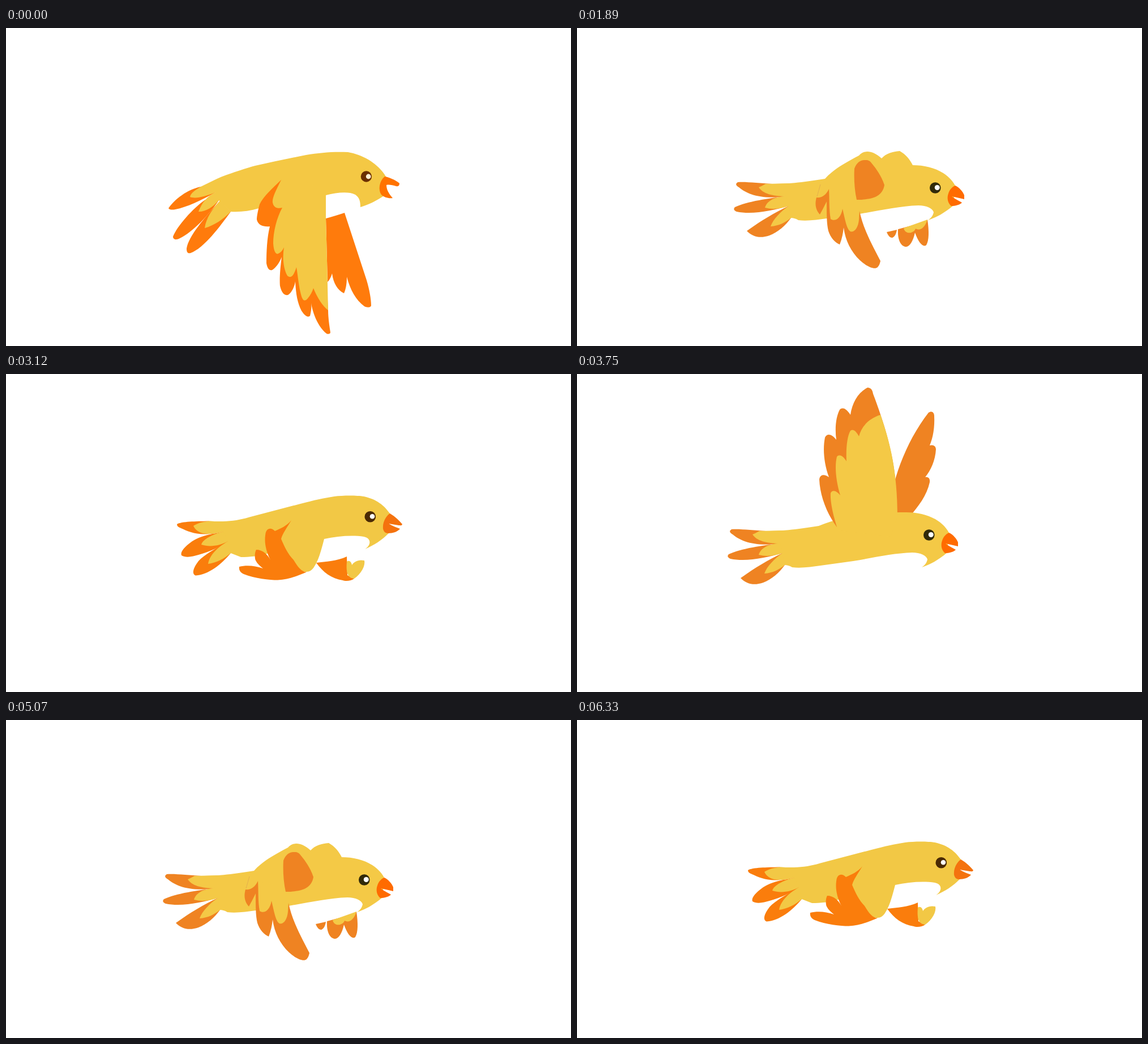
These frames come from a looping animation (998x561 px, 6.39 s). An HTML page:

```html
<!DOCTYPE html>
<html lang="en">
<head>
<meta charset="utf-8">
<title>Flying bird</title>
<style>
  html, body { margin: 0; width: 100%; height: 100%; overflow: hidden; background: #fff; }
  svg { display: block; width: 100%; height: 100%; }
  .pose { visibility: hidden; }
  .pose.on { visibility: visible; }
  .y { fill: var(--y); }
  .o { fill: var(--o); }
  .beak { fill: var(--beak); }
  .eye { fill: var(--eye); }
  .glint { fill: var(--glint, #fff); }
  .down { --y: #f4c844; --o: #ff7b0c; --beak: #ff7300; --eye: #6b2f00; --glint: #fff0d4; }
  .lift, .up { --y: #f4c946; --o: #ef8322; --beak: #ff6b00; --eye: #312a0a; }
  .fold { --y: #f2c845; --o: #fa7d0c; --beak: #f4720e; --eye: #4a2a04; }
</style>
</head>
<body>
<svg viewBox="0 0 998 561" preserveAspectRatio="none">
  <defs>
    <g id="tail">
      <path class="o" d="M345,275C322,274 300,271 284,272C279,275 281,278 286,281C300,293 325,303 370,297Z"/>
      <path class="o" d="M370,297C340,300 300,306 279,316C276,319 277,322 282,324C310,330 345,322 374,314Z"/>
      <path class="o" d="M374,314C350,325 325,340 300,358C312,370 325,371 340,366C355,360 369,348 378,335Z"/>
      <path class="y" d="M333,275C328,278 324,280 321,281C328,292 345,297 370,297L400,285L380,274Z"/>
      <path class="y" d="M370,297C350,297 335,305 332,317C348,321 362,318 374,314L400,300Z"/>
      <path class="y" d="M374,314C360,323 346,338 342,350C357,349 368,343 378,335L395,325Z"/>
    </g>
    <g id="face">
      <path class="beak" d="M668,278C675,281 682,289 684,295L684,302L662,297C668,302 675,305 680,308C676,312 668,314 661,314C655,309 653,300 656,292C658,285 663,280 668,278Z"/>
      <circle class="eye" cx="632.8" cy="282" r="9.8"/>
      <circle class="glint" cx="636.3" cy="281.5" r="4.5"/>
    </g>
  </defs>

  <!-- wings down -->
  <g class="pose down on">
    <path class="o" d="M565,336C577,333 588,329 598,326L637,445C642,462 645,478 645,490C643,494 637,493 633,491C618,480 608,462 602,439C602,452 600,462 597,468C586,463 578,450 576,433C574,440 571,445 568,448Z"/>
    <path class="o" d="M344,280C320,285 298,302 287,318C289,321 294,321 299,320C320,316 345,304 370,290Z"/>
    <path class="o" d="M352,303C330,318 302,350 295,368C295,374 302,374 307,371C330,360 358,330 376,304Z"/>
    <path class="o" d="M378,305C350,335 322,368 319,389C319,397 322,398 326,397C350,388 378,350 397,324Z"/>
    <path class="y" d="M344,280C336,285 326,291 325,298C335,302 352,297 370,290L390,270Z"/>
    <path class="y" d="M370,290C355,297 346,308 340,324C354,324 365,316 376,304L390,290Z"/>
    <path class="y" d="M378,305C365,318 353,336 351,353C368,348 383,338 397,324Z"/>
    <path class="y" d="M344,280C360,272 378,263 390,259C410,252 425,247 440,243C470,236 500,230 530,224C555,220 575,218 604,219C632,224 658,240 671,262L669,295C656,304 640,312 626,316C626,305 624,299 617,294C605,288 585,290 565,295L565,336L500,330L447,318C430,323 413,325 397,324L376,304L370,290Z"/>
    <path class="o" d="M486,268C468,285 455,297 448,311C445,322 443,332 443,338C445,348 455,351 466,350C461,370 460,395 460,415C462,426 466,428 470,427C476,424 483,414 487,404C484,425 483,445 484,455C487,468 492,472 498,471C505,467 510,455 511,447C512,470 515,485 522,499C528,508 533,511 537,508C539,500 540,492 539,485C542,505 552,528 566,539C570,541 573,539 573,537C571,525 569,510 569,498L560,330L520,280Z"/>
    <path class="y" d="M486,268C476,288 470,300 471,308C473,318 481,319 488,317C478,335 472,360 472,380C473,395 477,400 481,398C486,396 489,391 491,387C488,405 490,425 497,437C503,442 508,438 513,422C516,440 517,455 521,470C524,482 528,483 533,477C538,471 541,465 543,459C550,476 559,490 569,498C568,440 566,370 565,336L565,295L530,270Z"/>
    <path class="beak" d="M669,262C676,263 688,268 695,274C695,278 693,280 689,279C683,277 676,276 672,277C672,285 676,292 683,300C676,301 668,299 663,294C657,286 659,270 669,262Z"/>
    <circle class="eye" cx="636.4" cy="262" r="9.7"/>
    <circle class="glint" cx="640.2" cy="262" r="4.4"/>
  </g>

  <!-- wings lifting -->
  <g class="pose lift">
    <path class="o" d="M547,360L565,356C564,362 562,368 557,370C552,370 549,365 547,360Z"/>
    <path class="o" d="M567,355L615,342L619,338C622,358 622,375 617,383C611,388 603,378 597,361C594,375 588,386 581,386C571,385 566,372 567,355Z"/>
    <path class="y" d="M577,353C579,361 585,362 590,361C595,359 597,357 598,354C605,358 614,354 619,338Z"/>
    <use href="#tail"/>
    <path class="y" d="M333,275C380,276 410,270 438,266C452,250 475,237 498,225C506,216 520,214 538,230C546,221 558,218 570,217C581,223 588,232 593,242C625,242 655,254 668,278L665,313C648,327 635,334 620,339C627,334 629,330 630,325C628,318 618,313 603,313C570,314 535,322 499,328L441,336C425,338 408,341 391,339C386,336 382,335 378,335L374,314L370,297Z"/>
    <path class="o" d="M490,248C494,237 501,232 510,233C515,233 518,235 520,238C530,250 538,262 543,277C540,294 528,303 494,303C490,285 489,265 490,248Z"/>
    <path class="o" d="M423,299C420,310 421,320 429,329C434,320 437,314 441,306C441,330 441,345 444,358C448,370 455,378 464,382C468,372 470,362 471,352C474,375 484,395 500,410C512,421 526,427 531,422C534,419 535,415 536,411C520,380 506,355 499,323L470,318L445,284C440,295 432,300 423,299Z"/>
    <path class="y" d="M445,284C446,300 445,320 448,337C455,342 466,337 469,319C473,335 476,355 483,359C490,361 497,352 498,338L499,322L470,290Z"/>
    <path d="M430,276L424,297" fill="none" stroke="#dfa94e" stroke-width=".8"/>
    <use href="#face"/>
  </g>

  <!-- wings up -->
  <g class="pose up" transform="translate(-11 2)">
    <path class="o" d="M560,250C566,190 590,120 632,66C638,62 642,66 642,72C643,92 640,110 634,124C640,122 645,125 645,131C644,150 636,168 626,180C632,179 635,183 634,189C629,212 614,232 598,250Z"/>
    <use href="#tail"/>
    <path class="y" d="M333,275C380,276 410,270 438,266C480,248 540,241 593,242C625,242 655,254 668,278L665,313C648,327 635,334 620,339C627,334 629,330 630,325C628,318 618,313 603,313C570,314 535,322 499,328L441,336C425,338 408,341 391,339C386,336 382,335 378,335L374,314L370,297Z"/>
    <path class="o" d="M470,268C452,244 440,212 439,184C440,175 448,174 456,180C447,155 445,130 449,110C453,102 461,104 469,114C466,92 469,72 475,61C481,55 488,61 494,70C497,48 508,30 524,22C531,22 533,27 534,33C552,80 575,150 575,215L565,265Z"/>
    <path class="y" d="M472,274C464,250 458,224 459,208C463,201 470,205 476,212C468,185 466,160 470,144C475,138 482,144 487,152C486,130 488,108 494,98C500,94 505,101 509,108C513,92 525,77 547,70C564,118 577,170 577,250L565,285Z"/>
    <use href="#face"/>
  </g>

  <!-- wings folded -->
  <g class="pose fold">
    <path class="o" d="M548,333C565,331 585,330 602,322L603,355L615,361C610,365 600,366 595,364C575,361 560,350 548,333Z"/>
    <path class="y" d="M602,331C606,328 610,331 611,337C615,331 622,327 633,329C635,338 628,352 615,361C605,360 600,353 602,331Z"/>
    <path class="o" d="M358,259.5C335,260 310,260 302,265C302,269 305,270 309,272C325,279 342,288 384,278Z"/>
    <path class="o" d="M384,278C365,283 345,283 325,298C312,308 308,315 310,320C318,325 330,322 340,319C360,313 380,305 392,295Z"/>
    <path class="o" d="M392,295C370,308 350,319 340,330C330,343 328,353 335,355.5C358,354 380,336 397,316Z"/>
    <path class="y" d="M358,259.5C345,261 337,264 331,268C337,280 350,287 384,278L410,262Z"/>
    <path class="y" d="M384,278C365,283 348,291 345,301C360,306 378,303 392,295L410,285Z"/>
    <path class="y" d="M392,295C375,305 360,318 357,335C372,333 385,326 397,316L420,300Z"/>
    <path class="y" d="M358,259.5C385,261 405,260 430,252.5L520,229C545,222.5 560,219 580,216C595,214 620,214 632,216C655,221 668,232 678,246L676,281C664,293 650,302 634,309C645,302 646,290 632,287C612,284 585,286 562,291C556,315 551,330 545,339C541,346 536,349 530,349C520,349 515,340 500,320L463,316L457,319C445,321 430,323 415,323L397,316L392,295L384,278Z"/>
    <path class="o" d="M504,258C496,268 486,272 475,277C469,271 462,271 459,279C456,292 457,308 467,328C462,318 453,310 442,310C439,315 439,325 441,329C444,335 449,339 454,343C440,338 424,337 412,340C411,346 414,350 420,353C440,361 465,363.5 480,363.5C500,362.5 515,356 531,349.5C522,349 515,340 508,328C498,318 492,305 486,291C488,282 497,270 504,258Z"/>
    <path class="beak" d="M678,246C687,251 696,260 700,265C699,268 697,267 694,267L676,264C682,268 690,271 696,273C692,278 684,281 675,281C670,281 667,278 666,273C665,262 670,252 678,246Z"/>
    <circle class="eye" cx="643.3" cy="251.7" r="9.8"/>
    <circle class="glint" cx="647" cy="251.2" r="4.3"/>
  </g>
</svg>
<script>
  const LOOP = 6390;
  const shortSteps = [24, 47, 71];
  const poses = [...document.querySelectorAll('.pose')];
  const hold = i => shortSteps.includes(i) ? 60 : 90;

  function stepAt(t) {
    let i = 0;
    while (t >= hold(i)) t -= hold(i++);
    return i;
  }

  const start = performance.now();
  function draw() {
    const current = stepAt((performance.now() - start) % LOOP) % poses.length;
    poses.forEach((p, i) => p.classList.toggle('on', i === current));
    requestAnimationFrame(draw);
  }
  draw();
</script>
</body>
</html>
```
